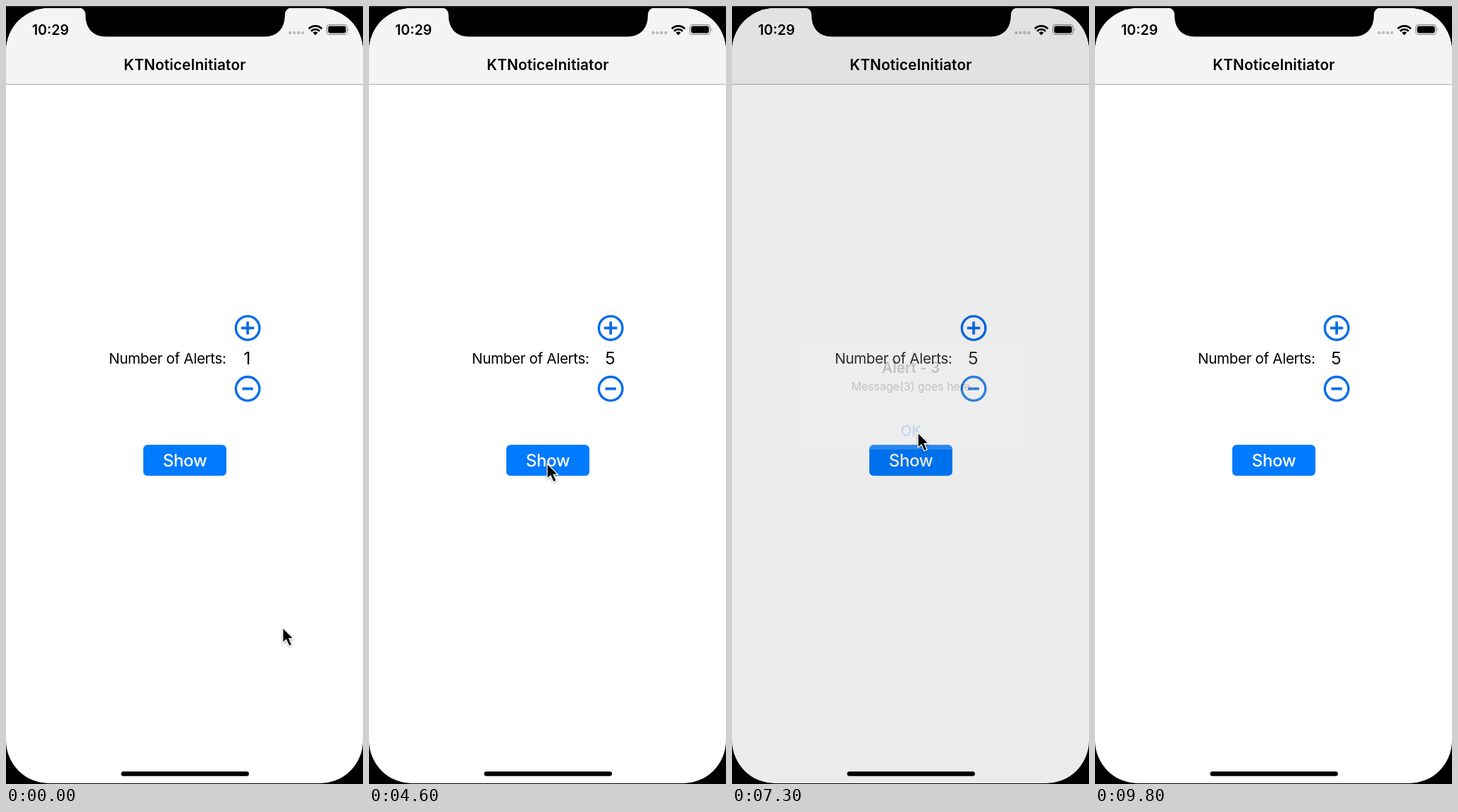
Write an HTML page that moves like this. It is 507x1105 px and loops after 10 s.

```html
<!DOCTYPE html>
<html lang="en">
<head>
<meta charset="utf-8">
<title>Alert queue</title>
<style>
  html, body { margin: 0; width: 100%; height: 100%; overflow: hidden; background: #000; }
  svg { display: block; width: 100%; height: 100%; }
  text { font-family: Inter, "Liberation Sans", sans-serif; fill: #000; }
  .mid { text-anchor: middle; }
  .bold { font-weight: 600; font-size: 20.8px; }
  .clock { font-weight: 600; font-size: 19.6px; }
  .label { font-size: 20.6px; letter-spacing: -.33px; }
  .count { font-size: 24.5px; }
  .show { font-size: 24px; font-weight: 500; letter-spacing: -.4px; fill: #fff; }
  .msg { font-size: 15.9px; }
  .ok { font-size: 20.8px; font-weight: 500; fill: #007aff; }
  .icon { fill: none; stroke: #056dea; stroke-width: 3.4; }
  #arrow { filter: drop-shadow(0 1.5px 1.5px rgba(0, 0, 0, .35)); }
</style>
</head>
<body>
<svg viewBox="0 0 507 1105" preserveAspectRatio="none">
  <defs>
    <clipPath id="glass"><rect y="3" width="507" height="1101" rx="61"/></clipPath>
    <clipPath id="card"><rect x="88.6" y="477" width="331" height="153" rx="16"/></clipPath>
  </defs>
  <rect width="507" height="1105"/>
  <rect width="507" height="1.5" fill="#2b2b2d"/>

  <g clip-path="url(#glass)">
    <rect width="507" height="1105" fill="#fff"/>
    <rect width="507" height="111" fill="#f4f4f4"/>
    <rect y="110.7" width="507" height="1.2" fill="#b5b5b5"/>
    <text class="clock" x="37" y="40.5">10:29</text>
    <g fill="#bcbcbc">
      <circle cx="403.5" cy="38" r="2.2"/><circle cx="409.5" cy="38" r="2.2"/>
      <circle cx="415.5" cy="38" r="2.2"/><circle cx="421.5" cy="38" r="2.2"/>
    </g>
    <g fill="none" stroke="#000" stroke-width="2.7">
      <path d="M430 32.2a13 13 0 0 1 18.6 0M433.2 35.8a8.4 8.4 0 0 1 12.2 0"/>
    </g>
    <path d="M439.3 41.5l-3.4-3.6a4.8 4.8 0 0 1 6.8 0z"/>
    <rect x="455.6" y="26.6" width="29" height="13.8" rx="4" fill="none" stroke="#8d8d8d" stroke-width="1.2"/>
    <rect x="457.5" y="28.5" width="25.2" height="10" rx="2.4"/>
    <path d="M486.3 31.2q1.8 2.3 0 4.6z" fill="#8d8d8d"/>
    <text class="bold mid" x="254" y="91.3" letter-spacing=".15">KTNoticeInitiator</text>

    <g class="icon">
      <circle cx="343.2" cy="457.4" r="16.8"/>
      <path d="M334 457.4h18.4M343.2 448.2v18.4" stroke-width="3.8"/>
    </g>
    <g class="icon" id="minus">
      <circle cx="343.2" cy="543.6" r="16.8"/>
      <path d="M335.5 543.6h15.4" stroke-width="3.8"/>
    </g>
    <text class="label" x="146" y="508">Number of Alerts:</text>
    <text class="count mid" id="count" x="342.5" y="509.3">1</text>
    <rect x="195" y="623.3" width="118" height="44" rx="6" fill="#007aff"/>
    <text class="show mid" id="show" x="254" y="654.3">Show</text>

    <rect id="dim" width="507" height="1105" opacity="0"/>
    <g id="alert" opacity="0">
      <g clip-path="url(#card)">
        <rect x="88" y="476" width="333" height="155" fill="#f4f4f4"/>
        <rect id="press" x="88" y="575.5" width="333" height="56" fill="#e1e2e4"/>
        <rect x="88" y="575" width="333" height="1.1" fill="#d2d2d5"/>
      </g>
      <text class="bold mid" id="head" x="254.2" y="521.3"></text>
      <text class="msg mid" id="body" x="254.2" y="546"></text>
      <text class="ok mid" x="254.5" y="610.6">OK</text>
    </g>
  </g>

  <path d="M102 2Q113 3 113 13.500C113 32 124 43.500 142 43.500H367C385 43.500 396 32 396 13.500Q396 3 407 2z"/>
  <rect x="163.500" y="1087.300" width="181.500" height="6.500" rx="3.200"/>
  <path id="arrow" d="M0 0V21.500L4.900 17L9 26L13 24.200L9.100 15.500H15.500z" stroke="#fff" stroke-width="1.300"/>
</svg>

<script>
const LOOP = 10000, RISE = 450, FADE = 300, DIM = 0.427;
const $ = id => document.getElementById(id);

// alert number, time it starts to appear, time it starts to fade
const alerts = [
  [1, 870, 1550],
  [5, 4720, 5420], [4, 5730, 6270], [3, 6570, 7080], [2, 7370, 7990], [1, 8280, 8960]
];
// pointer moves: start, end, destination
const home = [393, 883];
const moves = [
  [100, 720, 253, 650], [1180, 1400, 264, 606], [1750, 2220, 345.5, 449],
  [3680, 4200, 253, 650], [4930, 5220, 264, 606]
];
const taps = [2350, 2750, 3120, 3450];
const showTaps = [780, 4620];
const pointerOff = 9700;

const clamp = u => Math.min(1, Math.max(0, u));
const smooth = u => u * u * (3 - 2 * u);
const easeOut = u => 1 - (1 - u) ** 3;

function pointerAt(t) {
  let [x, y] = home;
  for (const [from, to, tx, ty] of moves) {
    const k = smooth(clamp((t - from) / (to - from)));
    x += (tx - x) * k;
    y += (ty - y) * k;
  }
  return [x, y];
}

function drawAlert(t) {
  const now = alerts.find(([, on, off]) => t >= on && t < off + FADE);
  let level = 0;
  if (now) {
    const [n, on, off] = now;
    const rise = easeOut(clamp((t - on) / RISE));
    level = rise * (1 - smooth(clamp((t - off) / FADE)));
    const s = 1.2 - 0.2 * rise;
    $('alert').setAttribute('transform', `translate(254.2 553.5) scale(${s}) translate(-254.2 -553.5)`);
    $('head').textContent = `Alert - ${n}`;
    $('body').textContent = `Message(${n}) goes here`;
    $('press').setAttribute('opacity', t > off - 130 && t < off ? 1 : 0);
  }
  $('alert').setAttribute('opacity', level);
  $('dim').setAttribute('opacity', level * DIM);
  $('minus').style.stroke = level > 0.2 ? '#555' : '';
}

function draw(t) {
  drawAlert(t);
  $('count').textContent = 1 + taps.filter(at => t >= at).length;
  const held = showTaps.some(at => t >= at && t < at + 420);
  $('show').setAttribute('opacity', held ? 0.65 : 1);
  $('arrow').setAttribute('transform', `translate(${pointerAt(t)})`);
  $('arrow').setAttribute('visibility', t < pointerOff ? 'visible' : 'hidden');
}

const start = performance.now();
function tick() {
  draw((performance.now() - start) % LOOP);
  requestAnimationFrame(tick);
}
tick();
</script>
</body>
</html>
```
